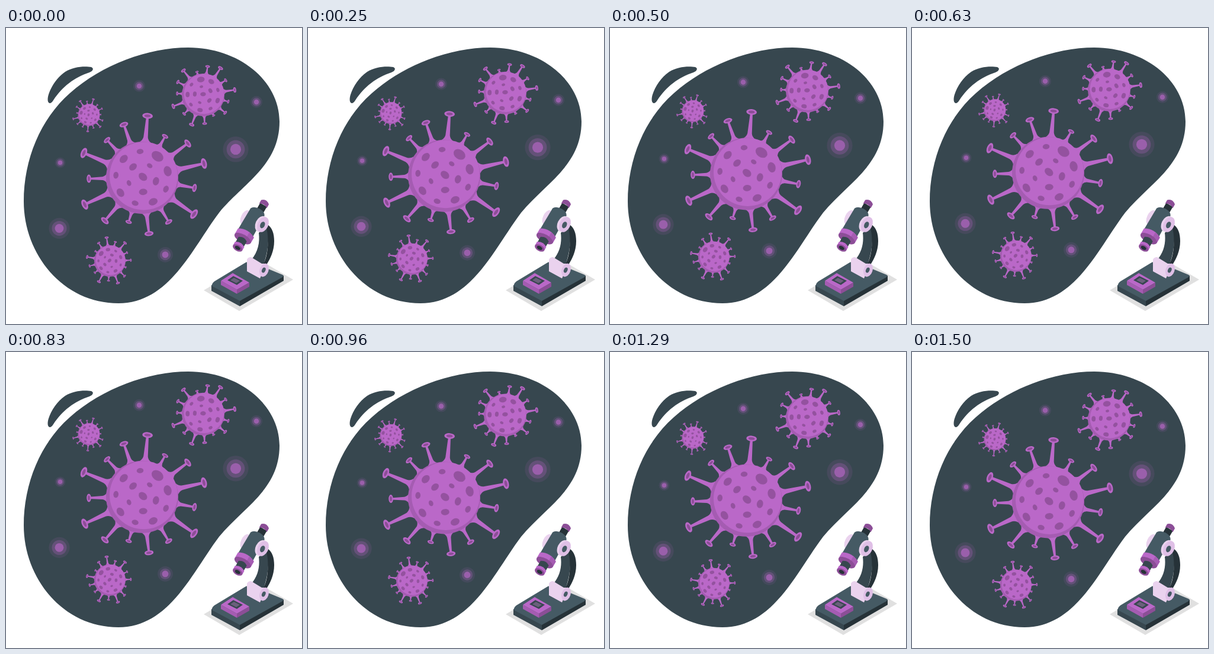
An HTML page for the animation above (1.54 s loop, 500 px wide and 500 px high).

```html
<!DOCTYPE html>
<html lang="en">
<head>
<meta charset="utf-8">
<title>Virus under the microscope</title>
<style>
  html, body { margin: 0; height: 100%; overflow: hidden; background: #fff; }
  svg { display: block; width: 100%; height: 100%; }
</style>
</head>
<body>
<svg viewBox="0 0 500 500">
  <g fill="#37474f">
    <path d="M308 33C392 33 462 88 462 158C462 232 401 262 360 312C314 373 276 465 190 465C96 465 30 382 30 293C30 222 58 154 108 110C162 62 240 33 308 33Z"/>
    <path d="M72 126C66 118 80 87 100 74C114 65 133 64 144 66C149 68 147 73 141 75C115 84 96 98 80 122C77 127 74 128 72 126Z"/>
  </g>

  <g id="floating"></g>

  <g id="microscope">
    <path fill="#e0e0e0" d="M334 443L394 478L485 425L425 390Z"/>
    <path fill="#37474f" d="M347 434V444L395 470V459Z"/>
    <path fill="#263238" d="M395 459V470L469 427V418Z"/>
    <path fill="#455a64" d="M348 436Q347 432 352 428L405 396Q409 394 414 395L465 416Q471 418 467 421L395 461Z"/>

    <path fill="#ba68c8" d="M363 427L383 414L411 430L390 442Z"/>
    <path fill="#a55cb2" d="M363 427V434L390 449V442Z"/>
    <path fill="#8c4e97" d="M390 442V449L411 437V430Z"/>
    <path fill="#37474f" d="M374 426L384 419L400 427L390 434Z"/>
    <path fill="#6b5f7c" d="M379 426L385 422L395 427L389 431Z"/>

    <path fill="#37474f" d="M427 346L440 333C446 350 443 380 434 402L414 392C426 378 429 362 427 346Z"/>
    <path fill="#263238" d="M440 331C450 336 453 348 453 360C453 377 446 390 440 400L435 398C443 385 445 352 439 335Z"/>

    <path fill="#ead2ee" d="M407 391Q409 387 414 387L432 398L440 398L429 423L407 411Z"/>
    <ellipse fill="#dfbfe6" cx="436" cy="409" rx="7.5" ry="11.5" transform="rotate(18 436 409)"/>
    <ellipse fill="#455a64" cx="435.3" cy="409" rx="3" ry="4.6" transform="rotate(25 435.3 409)"/>

    <ellipse fill="#ead2ee" cx="404" cy="320" rx="7" ry="13" transform="rotate(25 404 320)"/>
    <g transform="translate(410 335) rotate(30)">
      <path fill="#263238" d="M-3 -44H10V-26H-3Z"/>
      <path fill="#8c4e97" d="M-4 -42V-49Q3 -56 11 -49V-42Q3 -47 -4 -42Z"/>
      <path fill="#455a64" d="M-12.5 -28Q-10 -34 1 -35Q11 -35 14 -29L15 14H-13Z"/>
      <path fill="#ba68c8" d="M-14 23V12Q1 3 17 12V23Z"/>
      <path fill="#a55cb2" d="M6 8Q13 9 17 12V23H6Z"/>
      <ellipse fill="#8c4e97" cx="1.5" cy="23" rx="15.5" ry="7"/>
      <path fill="#37474f" d="M-6 24Q2 18 10 24V36H-6Z"/>
      <path fill="#ba68c8" d="M-7 41V34Q2 28 11 34V41Z"/>
      <ellipse fill="#8c4e97" cx="2" cy="41" rx="9" ry="5.2"/>
      <ellipse fill="#263238" cx="2" cy="41" rx="5" ry="3"/>
    </g>
    <ellipse fill="#ead2ee" cx="431" cy="331" rx="9.5" ry="14" transform="rotate(25 431 331)"/>
    <ellipse fill="#dfbfe6" cx="434" cy="332" rx="9" ry="13.5" transform="rotate(25 434 332)"/>
    <ellipse fill="#455a64" cx="433.3" cy="332.7" rx="3.8" ry="5.8" transform="rotate(25 433.3 332.7)"/>
  </g>
</svg>
<script>
const PURPLE = '#ba68c8', SHADE = '#a55cb2';
const LOOP = 1540, RISE = 10, LEAD = 40;
const RADIUS = 61, SPIKES = 15;
const REACH = [95, 78, 96, 107, 90, 107, 87]; // repeats around the body

const repeat = (count, draw) => Array.from({ length: count }, (_, i) => draw(i)).join('');
const ellipse = (rx, ry, attributes = '') => `<ellipse rx="${rx}" ry="${ry}" ${attributes}/>`;
// Makes the first of a series stand out
const lead = i => 0.2 ** i;

// Flared stalk with an oval cap, pointing away from the centre
function spike(i, stretch) {
  const reach = REACH[i % REACH.length] + 10 * lead(i);
  const length = reach * stretch;
  const w = (5.5 + (reach - 78) / 8) * stretch;
  const foot = 1 - RADIUS;
  return `<g transform="rotate(${5 + i * 360 / SPIKES})">
    <path d="M${-w * 1.1} ${foot}Q${-w * 0.5} ${foot - w * 0.4} ${-w * 0.42} ${foot - w}L${-w * 0.22} ${-length}
      H${w * 0.22}L${w * 0.42} ${foot - w}Q${w * 0.5} ${foot - w * 0.4} ${w * 1.1} ${foot}Z"/>
    <g transform="translate(0 ${-length})">${ellipse(w, w * 0.54)}
      ${ellipse(w * 0.6, w * 0.26, 'opacity=".25" fill="#000"')}</g></g>`;
}

function spot(angle, distance, size) {
  return `<g transform="rotate(${angle}) translate(0 ${-distance})" opacity=".2">
    ${ellipse(size, size * 0.75, 'fill="#000"')}
    <path d="M${-size * 0.65} 0Q0 ${-size * 0.8} ${size * 0.65} 0" fill="none" stroke="#000" stroke-width="${size * 0.2}"/></g>`;
}

// One spot in the middle, a ring of five and a ring of nine
const spots = spot(40, 2, 8) +
  repeat(5, i => spot(32 + i * 72, 24, 6.4 - 1.4 * Math.cos(i * 2.1))) +
  repeat(9, i => spot(35.5 + i * 40, 44.5, (i % 2 ? 7.8 : 5.8) + 5 * lead(i)));

function virus(x, y, radius, turn = 0, stretch = 1) {
  return `<g transform="translate(${x} ${y}) scale(${radius / RADIUS})" fill="${PURPLE}">
    <g transform="rotate(${turn})">${repeat(SPIKES, i => spike(i, stretch))}</g>
    <circle r="${RADIUS}" fill="${SHADE}"/>
    <circle cx="2.5" cy="-3" r="57.5"/>
    <g transform="rotate(${turn})">${spots}</g></g>`;
}

function glow(x, y, r) {
  return repeat(3, i =>
    `<circle cx="${x}" cy="${y}" r="${r * (2.35 - i * 0.68)}" fill="${PURPLE}" opacity="${0.11 * 2.4 ** i}"/>`);
}

const floating = document.getElementById('floating');
floating.innerHTML =
  glow(225, 98.5, 4.3) + glow(423, 125.5, 4.3) + glow(388, 205.5, 9.2) +
  glow(90, 339, 7.5) + glow(91.5, 228, 3.8) + glow(269, 383.5, 5.5) +
  virus(230, 253.5, 61) +
  virus(333, 113.5, 36, -44, 0.855) +
  virus(140, 147.5, 18.5, -109, 0.855) +
  virus(175.5, 394, 26.5, -85, 0.855);

// Rises at a steady rate for half the loop, then sinks back
function frame() {
  const phase = (performance.now() + LEAD) % LOOP / LOOP;
  const lift = RISE * (1 - Math.abs(1 - 2 * phase));
  floating.setAttribute('transform', `translate(0 ${-lift})`);
  requestAnimationFrame(frame);
}
frame();
</script>
</body>
</html>
```
